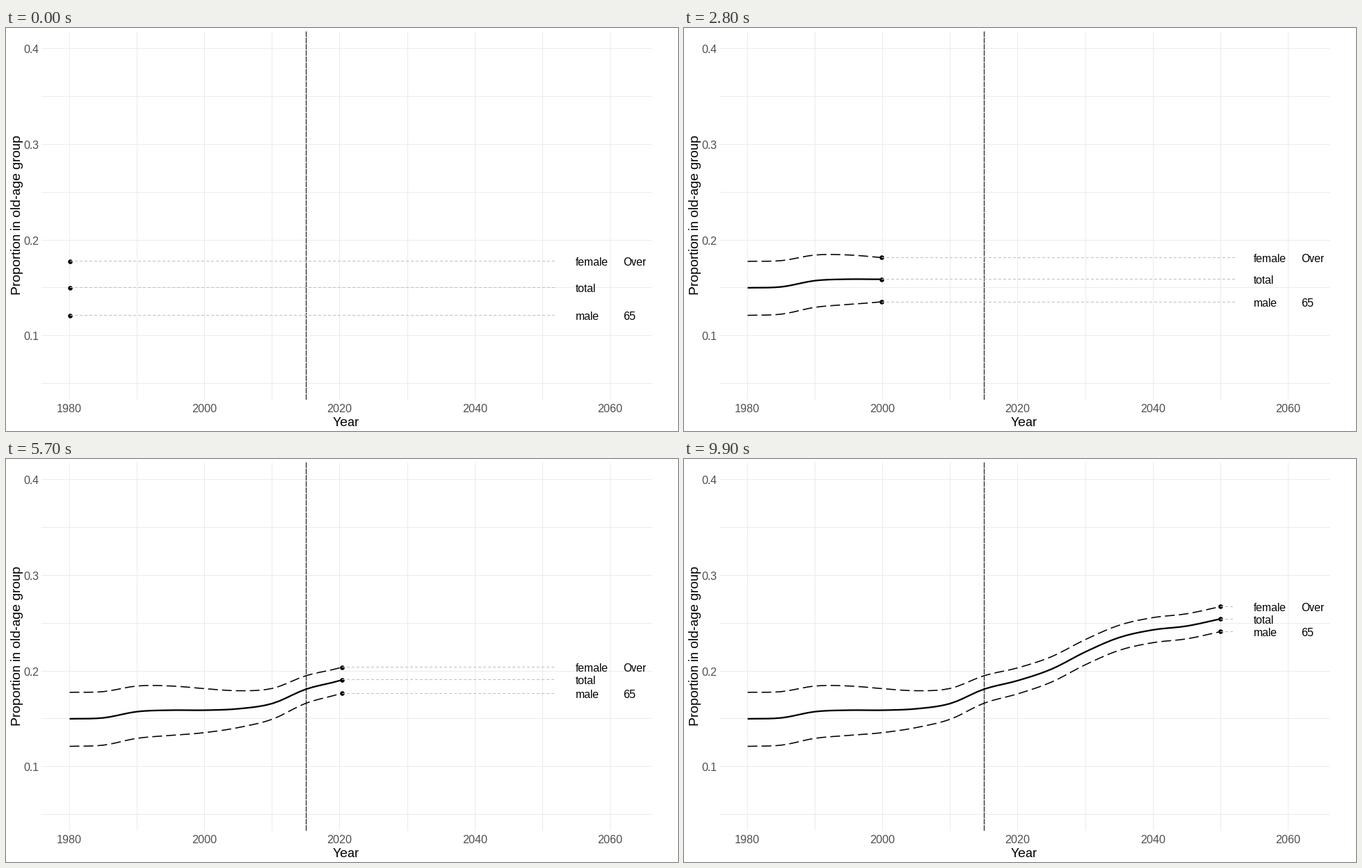
These frames come from a looping animation (966x580 px, 10 s). A matplotlib script:

```python
import matplotlib.pyplot as plt
import numpy as np
from matplotlib.animation import FuncAnimation

plt.rcParams.update({"font.family": "Liberation Sans",
                     "text.hinting": "native", "text.hinting_factor": 1})

W, H, DPI = 966, 580, 100
PX = 72 / DPI  # one pixel in points
FRAMES = 100
START, END = 1980, 2050
GRID, TICK, GUIDE = "#ebebeb", "#4d4d4d", "#bebebe"
TEXT_SIZE, TITLE_SIZE = 16, 19

# Total share in per cent, one key value every five years
KEYS = np.array([15.0, 15.1, 15.75, 15.9, 15.9, 16.05, 16.6, 18.1, 19.0,
                 20.2, 22.0, 23.5, 24.3, 24.7, 25.45]) / 100
SLOPES = np.gradient(KEYS)


def total_share(year):
    """Smooth Hermite curve through the five-year key values."""
    pos = (np.asarray(year, float) - START) / 5
    i = np.clip(pos.astype(int), 0, len(KEYS) - 2)
    u = pos - i
    ease = u * u * (3 - 2 * u)
    return (KEYS[i] + (KEYS[i + 1] - KEYS[i]) * ease
            + u * (1 - u) * (SLOPES[i] * (1 - u) - SLOPES[i + 1] * u))


def gap(year):
    """Distance of each sex from the total, narrowing around 2003."""
    return 0.0131 + 0.0153 / (1 + np.exp((year - 2003) / 5))


def year_x(year):
    return 91.5 + (year - START) * 9.71


def share_y(share):
    return 29.9 + (0.4 - share) * 1376


fig = plt.figure(figsize=(W / 100, H / 100), dpi=DPI, facecolor="white")
ax = fig.add_axes([0, 0, 1, 1])
ax.set(xlim=(0, W), ylim=(H, 0))
ax.axis("off")


def line(xs, ys, color, width=1, dash=None, smooth=False, **kw):
    """Line with its width and dash lengths in pixels."""
    style = (0, tuple(d / width for d in dash)) if dash else "-"
    return ax.plot(xs, ys, color=color, lw=width * PX, ls=style,
                   antialiased=smooth, solid_capstyle="butt",
                   dash_capstyle="butt", **kw)[0]


def label(x, y, text, color="black", ha="left", size=TEXT_SIZE, **kw):
    return ax.text(x, y, text, fontsize=size * PX, color=color, ha=ha,
                   va="baseline", **kw)


for year in range(START, 2061, 10):
    x = int(year_x(year))
    line([x, x], [5, 534], GRID, zorder=1)
    if year % 20 == 0:
        label(x, 553, str(year), TICK, "center")

for step in range(1, 9):
    y = int(share_y(step / 20))
    line([51, 928], [y, y], GRID, zorder=1)
    if step % 2 == 0:
        label(47, y + 7, f"{step / 20:.1f}", TICK, "right")

label(489, 573, "Year", ha="center", size=TITLE_SIZE)
label(21, 269.5, "Proportion in old-age group", ha="center", size=TITLE_SIZE,
      rotation=90, rotation_mode="anchor")
now_x = int(year_x(2015))
line([now_x, now_x], [534, 5], "black", dash=(8, 2), zorder=2)


class Series:
    def __init__(self, name, side, note=""):
        self.side = side
        width, dash = (1.6, (14, 6)) if side else (2.3, None)
        self.curve = line([], [], "black", width, dash, smooth=True, zorder=3)
        self.dot = ax.plot([], [], "o", color="black", ms=6.6 * PX, mew=0,
                           zorder=4)[0]
        self.guide = line([], [], GUIDE, dash=(4, 4), zorder=5)
        self.texts = [label(int(year_x(2055)), 0, name),
                      label(int(year_x(2062)), 0, note)]

    def reveal(self, year):
        years = np.append(np.arange(START, year), year)
        xs = year_x(years)
        ys = share_y(total_share(years) + self.side * gap(years))
        x, y = xs[-1], ys[-1]
        self.curve.set_data(xs, ys)
        self.dot.set_data([x], [y])
        self.guide.set_data([x, year_x(2052)], [int(y)] * 2)
        for text in self.texts:
            text.set_y(int(y) + 7)
        return [self.curve, self.dot, self.guide, *self.texts]


series = [Series("female", 0.98, "Over"), Series("total", 0),
          Series("male", -1.02, "65")]


def update(i):
    year = START + (END - START) * i / (FRAMES - 1)
    return [artist for s in series for artist in s.reveal(year)]


anim = FuncAnimation(fig, update, frames=FRAMES, interval=100,
                     init_func=lambda: update(0), repeat=True,
                     repeat_delay=0, blit=False)
plt.show()
```
